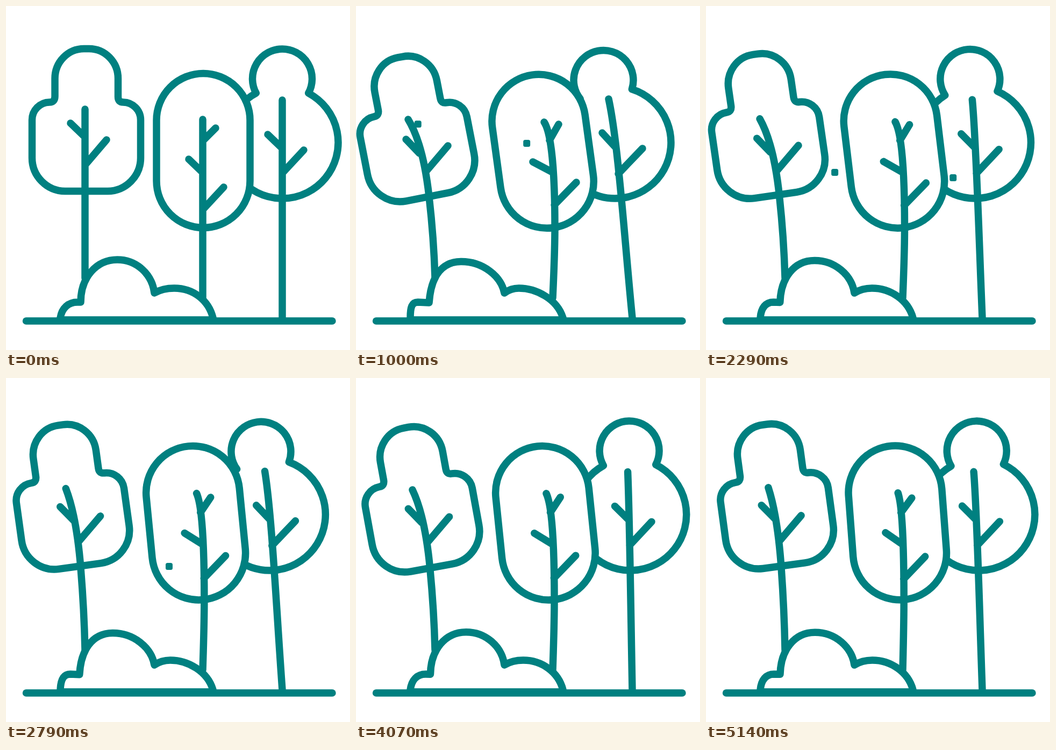
An HTML page that plays this animation: 640 px wide and 640 px high, repeating every 5210 ms.

```html
<!DOCTYPE html>
<html lang="en">
<head>
<meta charset="utf-8">
<title>Trees in the wind</title>
<style>
  html, body { margin: 0; width: 100%; height: 100%; overflow: hidden; background: #fff; }
  svg { display: block; width: 100vw; height: 100vh; }
  .line { fill: none; stroke: #008080; stroke-width: 13.5; stroke-linecap: round; stroke-linejoin: round; }
  .solid { fill: #fff; }
  .leaf { fill: #008080; }
</style>
</head>
<body>
<svg viewBox="0 0 640 640">
  <g class="line">
    <path id="crown3"/>
    <path id="trunk3"/>
    <rect id="crown2" class="solid" x="280" y="125.5" width="174" height="287" rx="87"/>
    <path id="crown1" d="M48.5 212V282A62 62 0 0 0 110 344.5H189A62 62 0 0 0 250.500 282V212A33 33 0 0 0 218 179Q208.500 179 208.500 169V135A54 55.500 0 0 0 154 79.500H145A54 55.500 0 0 0 91 135V168Q91 179 81 179A33 33 0 0 0 48.500 212Z"/>
    <path id="bush" class="solid"/>
    <path id="trunk1"/>
    <path id="trunk2"/>
    <path d="M37.500 586H607"/>
  </g>
  <g id="leaves"></g>
</svg>
<script>
const LOOP = 5210, STEP = LOOP / 73;
const $ = id => document.getElementById(id);

// time, tree 1: bend, tilt, drift; tree 2: bend; tree 3: trunk bend, crown shift
const sway = [
  [0, 0, 0, 0, 0, 0, 0],
  [570, .8, 7, 15, .75, .55, .55],
  [1000, 1, 11, 17.2, 1, 1, 1],
  [1330, .3, 3.5, 5, .25, .65, .5],
  [1570, .78, 6.5, 15.5, .66, .34, .17],
  [1760, .86, 7.2, 17.5, .76, .03, 0],
  [2290, .94, 8.2, 20, .88, .43, .43],
  [2600, 1, 11, 18, 1, .9, .9],
  [3120, 0, 0, 0, 0, .16, .16],
  [3210, .16, .8, .6, .08, .07, .065],
  [3300, .35, 2.5, 3, .25, 0, 0],
  [3650, 1, 11, 18, 1, .7, .65],
  [4070, .84, 10.3, 9, .75, .19, .1],
  [4320, .15, 2, 1, .12, .02, 0],
  [4800, 1, 11, 18, .95, .7, .65],
  [5140, .62, 7.7, 4.5, .55, .36, .19]
];

// time, x, y
const flights = [
  [[700, 185, 150], [1000, 115, 220], [1240, 55, 272]],
  [[450, 435, 235], [1000, 317.5, 255.5], [1570, 204, 250], [1900, 125, 285]],
  [[1250, 500, 70], [1570, 416, 119], [2290, 238, 311], [2600, 150, 375]],
  [[1950, 540, 250], [2290, 458, 320], [3210, 161.5, 372.5], [3500, 70, 395]]
];

// rest and fully bent outlines
const trunks = [
  ["M147 506C147 440 147 390 147 355C147 310 147 250 147 192M147 244L120 218M147 296L187 249",
   "M147 506C145 440 140 390 136 355C131 310 121 250 97 211M118 274L93 248M131 307L171 260"],
  ["M366 543C366 500 366 455 366 412C366 330 366 240 366 211M366 251L390 227M366 310L340 285M366 379L405 337",
   "M366 543C368 500 370 455 370 412C370 330 366 240 350 216M360 250L377 220M365 309L329 290M369 370L410 328"],
  ["M514 580C514 440 514 255 514 175M514 265L487 239M514 311L554 268",
   "M514 580C500 440 488 255 470 173M482 262L458 236M488 312L533 265"]
];
const bush = [
  "M101 584L101 580C104 562 116 551 133 551L139 551C139 504 169 472 207 472C243 472 272 499 276 534C288 527 300 525 313 525C349 525 377 548 385 580L385 584Z",
  "M101 584L101 580C101 560 104 551 115 551L136 552C139 510 155 476 195 475.5C235 475 270 502 276 534C284 528 293 525 303 525C335 525 374 545 385 580L385 584Z"
];

function mix([rest, bent], k) {
  const to = bent.match(/[\d.]+/g);
  let i = 0;
  return rest.replace(/[\d.]+/g, n => (+n + (to[i++] - n) * k).toFixed(2));
}

// smooth interpolation that never overshoots a key
function sample(keys, t) {
  let i = 0;
  while (i < keys.length - 2 && t >= keys[i + 1][0]) i++;
  const a = keys[i], b = keys[i + 1], h = b[0] - a[0];
  const u = Math.min(1, Math.max(0, (t - a[0]) / h));
  const slope = (j, c) => (keys[j + 1][c] - keys[j][c]) / (keys[j + 1][0] - keys[j][0]);
  const tangent = (j, c) => {
    if (j === 0) return slope(0, c);
    if (j === keys.length - 1) return slope(j - 1, c);
    const p = slope(j - 1, c), q = slope(j, c);
    return p * q > 0 ? 2 * p * q / (p + q) : 0;
  };
  return a.slice(1).map((v, n) => {
    const c = n + 1, d = b[c] - v;
    const m = tangent(i, c) * h, k = tangent(i + 1, c) * h;
    return v + u * (m + u * (3 * d - 2 * m - k + u * (m + k - 2 * d)));
  });
}

// outline of two overlapping circles, top one on the bottom one
function roundCrown(k) {
  const R = 104, r = 55.5;
  const X = 514 - 32 * k, Y = 254, x = 514 - 53.5 * k, y = 135.5 + 2.5 * k * k;
  const dx = x - X, dy = y - Y, d = Math.hypot(dx, dy);
  const along = (d * d + R * R - r * r) / (2 * d), side = Math.sqrt(R * R - along * along);
  const neck = s => `${X + (dx * along - s * dy * side) / d} ${Y + (dy * along + s * dx * side) / d}`;
  const right = neck(1), left = neck(-1);
  return `M${right}A${R} ${R} 0 1 1 ${left}A${r} ${r} 0 1 1 ${right}Z`;
}

const leaves = flights.map(() => {
  const leaf = document.createElementNS("http://www.w3.org/2000/svg", "rect");
  const attrs = { class: "leaf", x: -6.5, y: -6.5, width: 13, height: 13, rx: 3.5 };
  for (const name in attrs) leaf.setAttribute(name, attrs[name]);
  return $("leaves").appendChild(leaf);
});

function draw(t) {
  const [bend1, tilt, drift, bend2, bend3, shift] = sample(sway, t);
  $("crown1").setAttribute("transform",
    `translate(${-drift} ${bend1 * tilt * .98}) rotate(${-tilt} 149.5 344)`);
  $("crown2").setAttribute("transform", `rotate(${-7.8 * bend2} 367 412)`);
  $("crown3").setAttribute("d", roundCrown(shift));
  [bend1, bend2, bend3].forEach((k, i) => $("trunk" + (i + 1)).setAttribute("d", mix(trunks[i], k)));
  $("bush").setAttribute("d", mix(bush, bend3));

  flights.forEach((path, i) => {
    const start = path[0][0], end = path[path.length - 1][0];
    const size = Math.max(0, Math.min(1, (t - start) / 120, (end - t) / 120));
    const [x, y] = sample(path, t);
    leaves[i].setAttribute("transform", `translate(${x} ${y}) scale(${size})`);
  });
}

const begin = performance.now();
function tick() {
  const t = (performance.now() - begin) % LOOP;
  draw(Math.floor((t + 3) / STEP) % 73 * STEP);
  requestAnimationFrame(tick);
}
tick();
</script>
</body>
</html>
```
